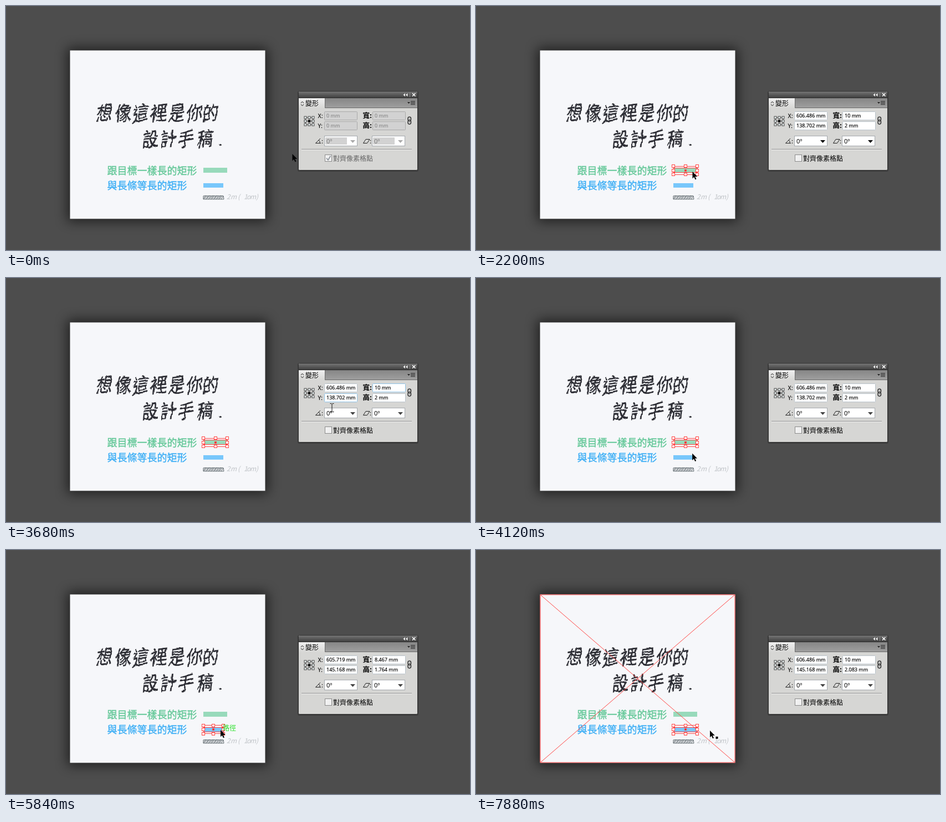
Write an HTML page that moves like this. It is 837x442 px and loops after 8 s.

```html
<!DOCTYPE html>
<html lang="zh-Hant">
<head>
<meta charset="utf-8">
<style>
html, body { margin: 0; width: 100%; height: 100%; overflow: hidden; background: #4d4d4d; }
svg { display: block; }
text { font-family: "Noto Sans CJK TC", "Noto Sans", sans-serif; }
.ink text { font-size: 35px; text-anchor: middle; fill: #2a2b31; stroke: #2a2b31; stroke-width: .5; }
.label { font-size: 18px; font-weight: 500; stroke-width: .35; }
.value { font: 500 9px "Noto Sans", sans-serif; stroke-width: .15; }
.key { font: 500 11px "Noto Sans", "Noto Sans CJK TC", sans-serif; }
.guide { font-size: 12px; fill: #2be02b; }
.red { fill: none; stroke: #ff4343; }
</style>
</head>
<body>
<svg width="837" height="442" viewBox="0 0 837 442">
  <defs>
    <filter id="blur" x="-20%" y="-20%" width="140%" height="140%"><feGaussianBlur stdDeviation="11"/></filter>
    <filter id="wobble" x="-5%" y="-10%" width="110%" height="120%">
      <feTurbulence type="fractalNoise" baseFrequency=".06" numOctaves="2" seed="4"/>
      <feDisplacementMap in="SourceGraphic" scale="6" xChannelSelector="R" yChannelSelector="G"/>
    </filter>
    <linearGradient id="bar" x2="0" y2="1"><stop stop-color="#747474"/><stop offset="1" stop-color="#404040"/></linearGradient>
    <linearGradient id="tabs" x2="0" y2="1"><stop stop-color="#868686"/><stop offset="1" stop-color="#a0a0a0"/></linearGradient>
    <linearGradient id="tab" x2="0" y2="1"><stop stop-color="#efefef"/><stop offset="1" stop-color="#d6d6d4"/></linearGradient>
  </defs>

  <rect width="837" height="442" fill="#4d4d4d"/>
  <rect x="111" y="76" width="361" height="314" opacity=".6" filter="url(#blur)"/>
  <rect x="115.500" y="80.500" width="352" height="305" fill="#f6f7fa"/>
  <g class="ink" id="ink" filter="url(#wobble)"></g>
  <text class="label" x="182.500" y="304.500" fill="#62c797" stroke="#62c797">跟目標一樣長的矩形</text>
  <text class="label" x="182.500" y="331.500" fill="#3caef5" stroke="#3caef5">與長條等長的矩形</text>
  <rect x="356" y="293" width="43" height="9" fill="#98dabb"/>
  <rect id="blue" x="356" y="321" height="8" fill="#78c7fb"/>
  <path id="scribble" fill="none" stroke="#5c666b" stroke-width="1"/>
  <text x="398 405 418 429 434 440 451" y="350" font-size="12" font-weight="300" font-style="italic" fill="#c0c4c8">2m(1om)</text>

  <g id="panel">
    <rect x="526" y="154" width="218" height="146" rx="3" opacity=".22"/>
    <rect x="527.500" y="154.500" width="215" height="143" rx="2" fill="#d6d6d4" stroke="#333"/>
    <rect x="528" y="155" width="214" height="11" fill="url(#bar)"/>
    <path d="M528 166.500H742" stroke="#2e2e2e"/>
    <rect x="528" y="167" width="214" height="18" fill="url(#tabs)"/>
    <rect x="528" y="167" width="47" height="19" fill="url(#tab)"/>
    <path d="M575.500 167V184.500H742" fill="none" stroke="#6a6a6a"/>
    <path d="M720 158V164L716.500 161ZM724.500 158V164L721 161Z" fill="#eee"/>
    <path d="M728.500 157V165" stroke="#888"/>
    <path d="M733 158L738.500 163.500M738.500 158L733 163.500" stroke="#fff" stroke-width="1.500"/>
    <path d="M724 174H729L726.500 177Z" fill="#222"/>
    <path d="M730 172.500H738M730 174.500H738M730 176.500H738M730 178.500H738" stroke="#333"/>
    <path d="M532 176L534.500 173L537 176M532 178L534.500 181L537 178" fill="none" stroke="#222"/>
    <text x="540" y="181" font-size="12">變形</text>
    <path d="M540 202H554V215H540ZM540 208.500H554M547 202V215" fill="none" stroke="#555"/>
    <g id="anchors" stroke="#444"></g>
    <g class="key"><text x="562.500" y="202.500">X:</text><text x="562.500" y="220.500">Y:</text></g>
    <g font-size="12.500" font-weight="700"><text x="643.500" y="203">寬:</text><text x="643.500" y="221">高:</text></g>
    <path d="M567 240L558.500 248.500H568M564 243Q567 245 566 248M649 241.500H656L651.500 248.500H644.500Z" fill="none" stroke="#222"/>
    <g class="key"><text x="569" y="249">:</text><text x="656" y="249">:</text></g>
    <g fill="none" stroke="#333" stroke-width="1.500">
      <rect x="725" y="201" width="5.500" height="7" rx="2.700"/><rect x="725" y="207" width="5.500" height="7" rx="2.700"/>
      <path d="M727.800 204V211" stroke="#777"/>
    </g>
    <g id="fields"></g>
    <path d="M533 259.500H732" stroke="#8f8f8f"/><path d="M533 260.500H732" stroke="#f4f4f4"/>
    <rect x="575.500" y="269.500" width="12" height="12" fill="#f0f0f0" stroke="#8b8b8b"/>
    <path id="tick" d="M578 275.500L581 279L585.500 271.500" fill="none" stroke="#8f969e" stroke-width="1.700"/>
    <text id="snap" x="590" y="280.500" font-size="12">對齊像素格點</text>
  </g>

  <g id="hover" class="red"><path d="M116 81H467V385H116ZL467 385M467 81L116 385"/></g>
  <g id="select" shape-rendering="crispEdges"></g>
  <g id="guide"><path class="red" d="M399.500 294V322M397 300.500L402 305.500M402 300.500L397 305.500" stroke-opacity=".7"/><text class="guide" x="402" y="323">交集</text></g>
  <text id="path" class="guide" x="391" y="327">路徑</text>
  <path id="cursor"/>
</svg>
<script>
const $ = id => document.getElementById(id);
const set = (id, attrs) => { for (const k in attrs) $(id).setAttribute(k, attrs[k]); };
const show = (id, on) => set(id, { visibility: on ? 'visible' : 'hidden' });

// Handwriting: glyph centres along two lines, strokes rising to the right.
const write = (chars, xs, y) => [...chars].map((c, i) =>
  `<text transform="translate(${xs[i]} ${y}) skewY(${-8 + 3 * Math.sin(i * 2.1)}) skewX(-6) scale(${i % 2 ? .86 : .82} 1)">${c}</text>`).join('');
$('ink').innerHTML = write('想像這裡是你的', [176, 210, 242, 274, 307, 339, 368], 207)
  + write('設計手稿', [259, 291, 323, 358], 254)
  + '<path d="M384 252L388 251" stroke="#2a2b31" stroke-width="2.500"/>';

let hatch = 'M356 344H392L393 350H356Z';
for (let i = 0; i < 15; i++) hatch += `M${356 + i * 2.3} ${350 - i % 2}L${360 + i * 2.3} ${343 + i % 3 / 2}`;
set('scribble', { d: hatch });

const square = (x, y, s, fill) => `<rect x="${x - s / 2}" y="${y - s / 2}" width="${s}" height="${s}" fill="${fill}"/>`;
let anchors = '';
for (const x of [540, 547, 554]) for (const y of [202, 208.5, 215])
  anchors += square(x, y, 4, x === 547 && y === 208.5 ? '#000' : '#eef6f6');
$('anchors').innerHTML = anchors;

function field(x, y, value, on, hot) {
  const ink = on ? '#000' : '#8c8c8c';
  return `<rect x="${x + .5}" y="${y + .5}" width="59" height="15" rx="1" fill="${on ? '#fff' : '#d2d2d2'}" stroke="${hot ? '#8fc3e8' : on ? '#b9c3cb' : '#a9a9a9'}"/>
    <text class="value" x="${x + 4}" y="${y + 11}" fill="${ink}" stroke="${ink}">${value}</text>`;
}
function dropdown(x, on, arrow) {
  return `<rect x="${x + .5}" y="235.5" width="59" height="18" fill="#fff" stroke="#a4a9ae"/>
    ${on ? '' : `<rect x="${x + 2}" y="238" width="39" height="13" fill="#d2d2d2"/>`}
    <text class="key" x="${x + 4}" y="248.5" fill="${on ? '#000' : '#777'}">0º</text>
    <path d="M${x + 47} 243H${x + 56}L${x + 51.5} 248Z" fill="${arrow}"/>`;
}

function drawPanel(t) {
  const on = t >= 2000;
  const [x, y, w, h] = !on ? ['0 mm', '0 mm', '0 mm', '0 mm']
    : t < 4760 ? ['606.486 mm', '138.702 mm', '10 mm', '2 mm']
    : t < 7000 ? ['605.719 mm', '145.168 mm', '8.467 mm', '1.764 mm']
    : ['606.486 mm', '145.168 mm', '10 mm', '2.083 mm'];
  const arrow = !on ? '#aaa' : t < 2800 ? '#000' : '#444';
  $('fields').innerHTML = field(574, 191, x, on) + field(574, 209, y, on, t >= 3640 && t < 3880)
    + field(661, 191, w, on, t >= 2640 && t < 3880) + field(661, 209, h, on)
    + dropdown(574, on, arrow) + dropdown(660, on, arrow);
  show('tick', !on);
  set('snap', { fill: on ? '#000' : '#666' });
}

function selection(right, cy) {
  const top = cy - 7.5, bottom = cy + 7.5, mid = (356 + right) / 2;
  let s = `<path class="red" d="M356 ${top}H${right}V${bottom}H356ZM356 ${cy - 4}H${right}V${cy + 4}H356Z"/>`;
  for (const x of [356, mid, right]) for (const y of [top, cy, bottom])
    s += x === mid && y === cy ? square(x, y, 4, '#ff4343')
      : `<g stroke="#ff4343">${square(x, y, 5, '#fff')}</g>`;
  return s;
}

// time, x, y; easing power of the move that ends here (0 = jump)
const track = [
  [0, 516.5, 268, 0], [80, 516, 269, 0], [480, 516, 269, 0], [1240, 392, 301, 2], [1360, 391, 301, 0],
  [1520, 390.5, 300, 0], [2200, 390.5, 300, 0], [2800, 714, 210, 2], [3000, 743, 206, 0],
  [3480, 743, 206, 0], [3680, 588, 235, 1], [4280, 375, 324, 2], [4720, 375, 324, 0],
  [5120, 386, 324, 2], [5280, 386.5, 325.5, 0], [5480, 386.5, 325.5, 0], [5840, 387, 326, 1],
  [6000, 393, 326.5, 1], [6240, 393, 326.5, 0], [6480, 400, 327, 1.5], [6960, 400, 327, 0],
  [7280, 420, 326.5, 2], [7520, 421, 327, 0], [7880, 422, 327, 0]
];
function position(t) {
  let i = track.length - 1;
  while (track[i][0] > t) i--;
  const [t0, x, y] = track[i], next = track[i + 1];
  if (!next || !next[3]) return [x, y];
  const p = 1 - (1 - (t - t0) / (next[0] - t0)) ** next[3];
  return [x + (next[1] - x) * p, y + (next[2] - y) * p];
}

const ARROW = 'M0 0V12.500L2.800 9.800L5 14.500L7 13.600L4.800 9H8.800Z';
const DOT = 'M10.500 11H14.500V15H10.500Z';
const BEAM = 'M-3.500 -7.500H-1L0 -6.500L1 -7.500H3.500M0 -6.500V6.500M-3.500 7.500H-1L0 6.500L1 7.500H3.500';
const RESIZE = 'M-7 .500L-3 -3.500V-.500H-1V-3H1V-.500H3V-3.500L7 .500L3 4.500V1.500H1V4H-1V1.500H-3V4.500Z';

function drawCursor(t) {
  const [x, y] = position(t);
  const overField = y > 190 && y < 254 && (x > 574 && x < 634 || x > 661 && x < 720);
  const dotted = t >= 1360 && t < 1520 || t >= 4280 && t < 4400 || t >= 7120;
  const resize = t >= 5960 && t < 7040;
  set('cursor', {
    d: overField ? BEAM : resize ? RESIZE : dotted ? ARROW + DOT : ARROW,
    transform: `translate(${x} ${y})`,
    fill: overField ? 'none' : '#050505',
    stroke: overField ? '#111' : 'none'
  });
}

function draw(now) {
  const t = Math.floor(now % 8000 / 40) * 40;
  const right = 392 + 7 * Math.min(1, Math.max(0, (t - 6240) / 240));
  drawPanel(t);
  set('blue', { width: t < 6720 ? 36 : 43 });
  $('select').innerHTML = t < 1520 ? '' : t < 4400 ? selection(399, 297.5) : selection(right, 325);
  show('hover', t >= 7120);
  show('guide', t >= 6480 && t < 6760);
  show('path', t >= 5680 && t < 5960);
  drawCursor(t);
  requestAnimationFrame(draw);
}
draw(0);
</script>
</body>
</html>
```
